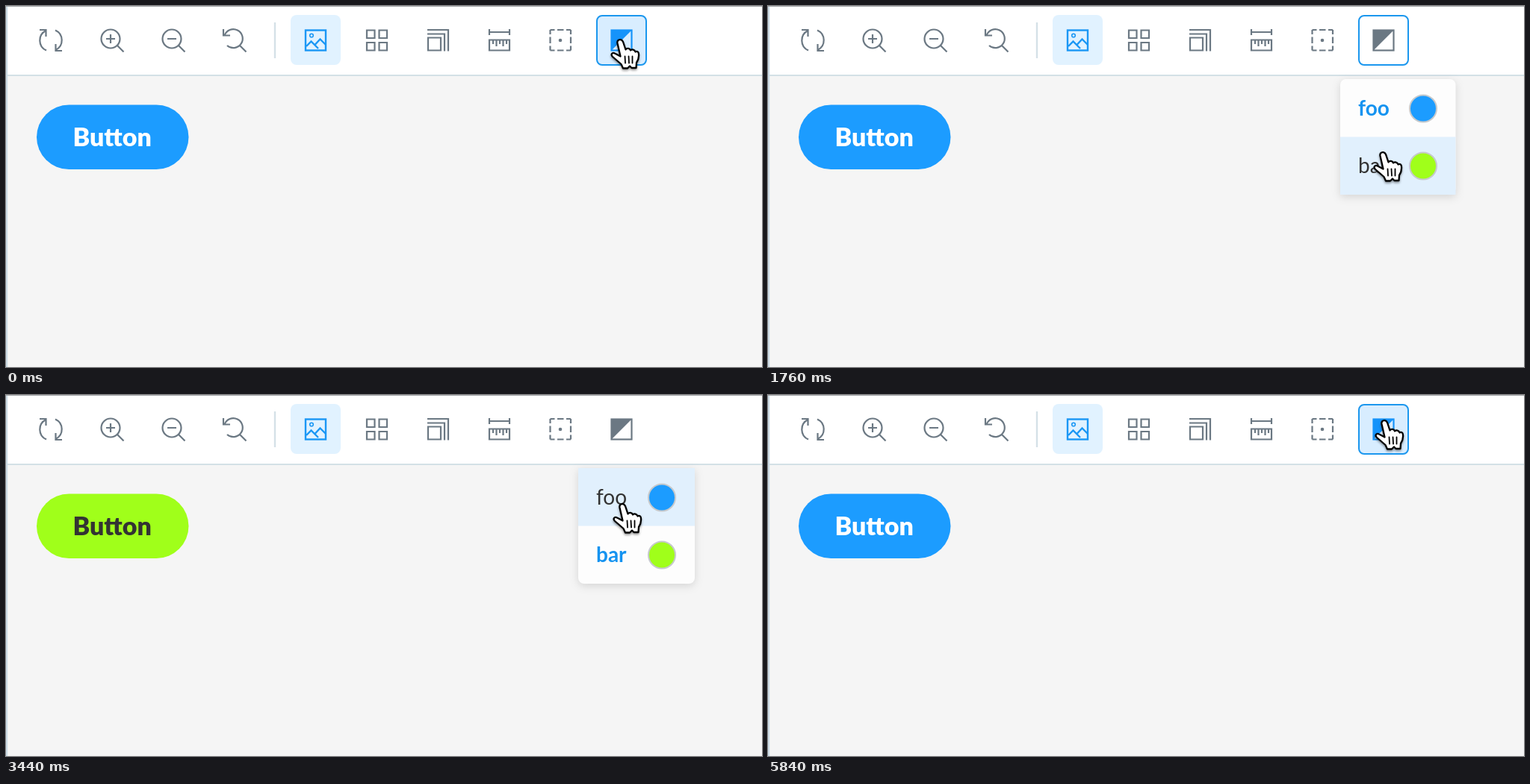
Recreate the animation shown at these times as an HTML page. Size 1012 px wide and 484 px high, loop 5920 ms.

```html
<!DOCTYPE html>
<html lang="en">
<head>
<meta charset="utf-8">
<style>
  html, body { margin: 0; width: 100%; height: 100%; overflow: hidden; background: #f5f5f5; }
  svg { display: block; width: 1012px; height: 484px; font-family: Lato, sans-serif; }
  .icons { fill: none; stroke: #6b7883; stroke-width: 2.2; }
  #label { font-size: 34px; font-weight: 900; }
  .item { font-size: 28px; fill: #333; }
  .item.on { font-weight: 700; fill: #1593f0; }
  .swatch { stroke: #c6c9cc; stroke-width: 2; }
  #menu { filter: drop-shadow(0 3px 6px rgba(0, 0, 0, .13)); }
  #hand { filter: drop-shadow(0 2px 1.5px rgba(0, 0, 0, .4)); }
</style>
</head>
<body>
<svg viewBox="0 0 1012 484">
  <rect width="1012" height="93" fill="#fff"/>
  <path d="M0 93H1012" stroke="#d3e0e6" stroke-width="2"/>
  <path d="M1 0V484" stroke="#cddce6" stroke-width="2.4"/>
  <path d="M0 .5H1012" stroke="#a3a6a8"/>
  <path d="M360 22V70" stroke="#d5e1e7" stroke-width="2.4"/>
  <rect x="381" y="12" width="67" height="67" rx="8" fill="#e1f2ff"/>
  <rect id="tool" x="791" y="13" width="66" height="66" rx="7" stroke="#1b97ee"/>

  <g class="icons">
    <path id="sync" d="M45 32H53.500V41M53.500 33A14.700 14.700 0 0 0 54 59.600"/>
    <use href="#sync" transform="rotate(180 60 46)"/>
    <g id="lens"><circle cx="140" cy="44" r="12.500"/><path d="M149 53L157.500 61.500M134 44H146"/></g>
    <path d="M140 38V50"/>
    <use href="#lens" x="82"/>
    <path d="M291 31V39.500H300M292.500 39.500A12.500 12.500 0 1 1 296 53M313 53L321.500 61.500"/>
    <g stroke="#1b97f5" stroke-width="2.400">
      <rect x="401" y="32.500" width="27" height="27"/>
      <circle cx="409" cy="39.500" r="2.300" stroke-width="1.600"/>
      <path d="M402 54L408.500 47.500L418 57M413.500 52L420.500 44.500L428 52"/>
    </g>
    <path d="M483 32.500h10.500v10.500h-10.500zM499.500 32.500h10.500v10.500h-10.500zM483 49h10.500v10.500h-10.500zM499.500 49h10.500v10.500h-10.500z"/>
    <path d="M565 42.500h17v17h-17zM564 37.500H587V60.500M564 32H592V60.500"/>
    <path d="M647 31V39M674 31V39M647 35H674M647 45.500H674V59.500H647zM652 46V51M656.500 46V54M661 46V51M665.500 46V54M670 46V51"/>
    <path d="M728.500 32h27.500v27.500h-27.500z" stroke-dasharray="6 3.500 8.500 3.500 6 0"/>
    <circle cx="742" cy="46" r="2.300" fill="#6b7883" stroke="none"/>
    <g id="contrast"><rect x="810.500" y="32.500" width="27" height="27"/><path d="M810 32H838L810 60z" stroke="none"/></g>
  </g>

  <rect id="button" x="41" y="132.500" width="203.500" height="86.500" rx="43.250"/>
  <text id="label" x="89.500" y="188">Button</text>

  <g id="menu">
    <rect id="panel" x="766" y="98" height="155" rx="8" fill="#fdfdfd"/>
    <rect id="row" x="766" height="77.500" fill="#e1f0fd"/>
    <text class="item" x="790" y="147">foo</text>
    <text class="item" x="790" y="224">bar</text>
    <circle class="swatch" cy="137.500" r="18" fill="#1c9cff"/>
    <circle class="swatch" cy="214.500" r="18" fill="#a0ff1a"/>
  </g>

  <g id="hand" stroke="#000" stroke-linejoin="round" stroke-linecap="round">
    <path fill="#fff" stroke-width="2.300" d="M-3.500 5C-4.500 -.500 2 -1.500 4 3L7.500 13.500C9 11 13 11.500 14 14.500C16 12.500 19.500 13.500 20.500 16.500C22.500 15 25 16.500 25 19.500C25.500 25 24 28 22 31L21.500 38H15.500L13 35.500L10 38.500H4L1.500 33L-10 23C-13 20 -10.500 16.500 -7 18.500L.500 22.500Z"/>
    <path fill="none" stroke-width="1.800" d="M6.500 22.500L7 31.500M11.500 22.500L12 31.500M16.500 22.500V31.500"/>
  </g>
</svg>
<script>
  const LOOP = 5920, STEP = 80;
  const BLUE = '#1c9cff', GREEN = '#a0ff1a';
  // time, x, y of the fingertip
  const path = [
    [0, 822, 45], [720, 822, 45], [1200, 820, 119], [1440, 820, 119],
    [1760, 823, 196], [2640, 823, 196], [2880, 825, 151], [3360, 825, 146],
    [4160, 825, 146], [4480, 825, 34], [LOOP, 825, 34]
  ];
  const $ = id => document.getElementById(id);
  const set = (el, attrs) => { for (const k in attrs) el.setAttribute(k, attrs[k]); };
  const items = document.querySelectorAll('.item');
  const swatches = document.querySelectorAll('.swatch');

  function pointer(t) {
    const i = path.findIndex(p => p[0] > t);
    const [t0, x0, y0] = path[i - 1], [t1, x1, y1] = path[i];
    const u = (t - t0) / (t1 - t0), e = u * u * (3 - 2 * u);
    return [x0 + (x1 - x0) * e, y0 + (y1 - y0) * e];
  }

  function draw(t) {
    const [x, y] = pointer(t);
    const open = t >= 400 && t < 5040;
    const bar = t >= 2240 && t < 3520;
    const overTool = y < 80, overMenu = open && y > 98;
    const focus = t < 2240 || t >= 5040 ? 1 : t >= 4880 ? .6 : 0;
    const ink = overTool ? '#1593fa' : '#6b7883';

    set($('hand'), { transform: `translate(${x} ${y})` });
    set($('tool'), { fill: overTool ? '#d8edff' : 'none', 'stroke-width': 2 * focus });
    set($('contrast'), { stroke: ink, fill: 'none' });
    set($('contrast').lastChild, { fill: ink });
    set($('button'), { fill: bar ? GREEN : BLUE });
    set($('label'), { fill: bar ? '#333' : '#fff' });
    set($('menu'), { visibility: open ? 'visible' : 'hidden' });
    set($('panel'), { width: bar ? 156 : 154.5 });
    set($('row'), { width: bar ? 156 : 154.5, y: y < 176 ? 98 : 175.5, opacity: +overMenu });
    items.forEach((el, i) => el.classList.toggle('on', bar === (i === 1)));
    swatches.forEach(el => set(el, { cx: bar ? 878 : 877 }));
  }

  function tick() {
    const t = performance.now() % LOOP;
    draw(Math.floor(t / STEP) * STEP);
    requestAnimationFrame(tick);
  }
  tick();
</script>
</body>
</html>
```
